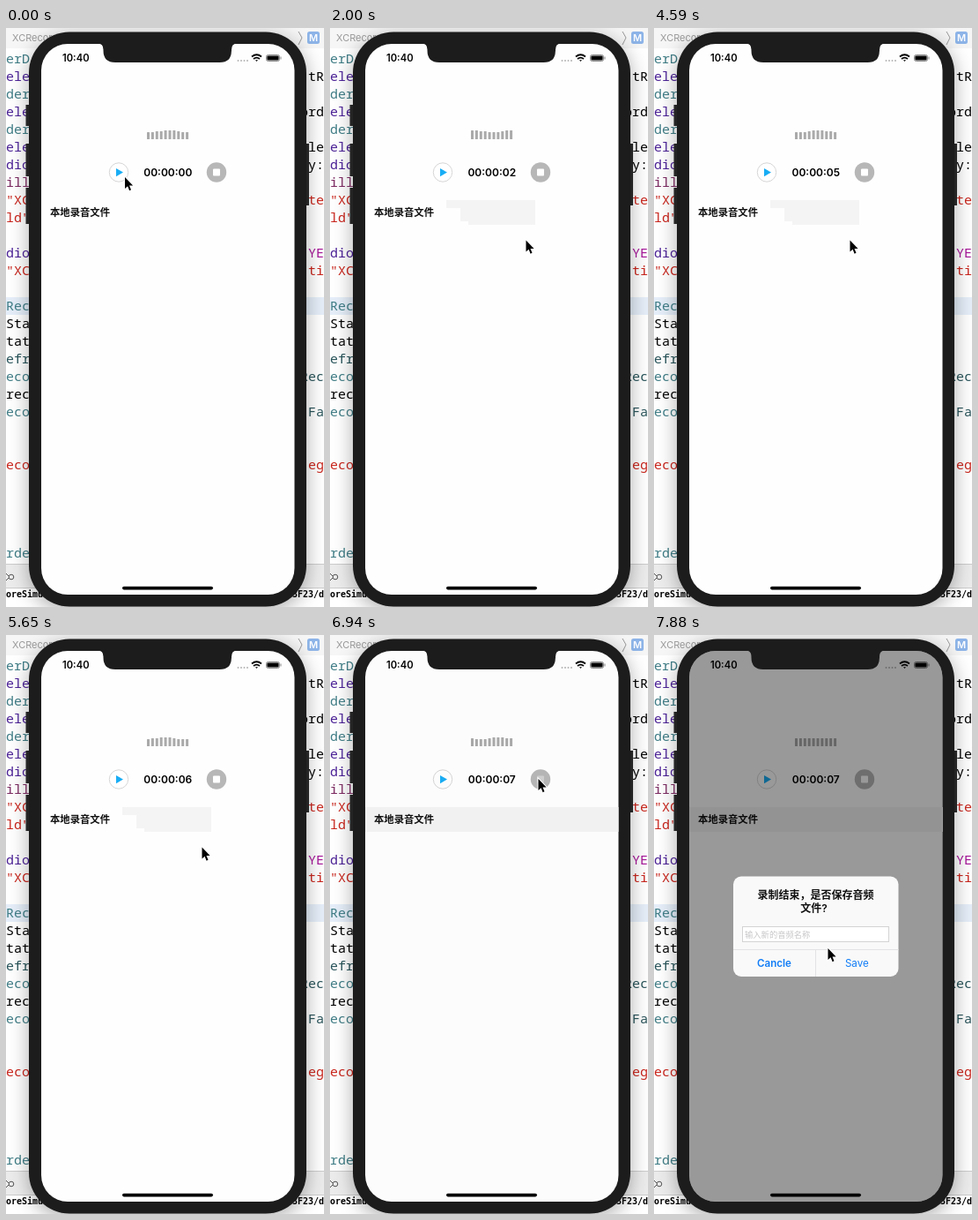
These frames come from a looping animation (361x656 px, 8000 ms). An HTML page:

```html
<!DOCTYPE html>
<html lang="zh-CN">
<head>
<meta charset="utf-8">
<title>Voice recorder</title>
<style>
  html, body { margin: 0; width: 100%; height: 100%; overflow: hidden; background: #fff; }
  svg { display: block; width: 361px; height: 656px; }
  text { font-family: Inter, "Noto Sans CJK SC", "Noto Sans CJK", sans-serif; white-space: pre; }
  .code text { font: 15px "Noto Sans Mono", "DejaVu Sans Mono", monospace; }
  .code .right { text-anchor: end; }
  .console { font: bold 10px "DejaVu Sans Mono", monospace; }
  .mid { text-anchor: middle; }
  .bold { font-weight: 600; }
  .title { font-size: 12px; font-weight: 600; fill: #111; }
  .action { font-size: 11.6px; fill: #107cf6; }
</style>
</head>
<body>
<svg viewBox="0 0 361 656">
  <defs>
    <filter id="shadow" x="-20%" y="-10%" width="140%" height="120%">
      <feDropShadow dx="0" dy="5" stdDeviation="11" flood-opacity=".32"/>
    </filter>
    <clipPath id="screen"><rect x="40" y="18" width="287.5" height="624" rx="30"/></clipPath>
  </defs>

  <!-- editor behind the phone -->
  <rect width="361" height="656" fill="#fff"/>
  <rect width="361" height="23" fill="#f6f6f6"/>
  <text x="7" y="15" font-size="11" fill="#9a9a9a">XCRecorder</text>
  <path d="M332 4l4 7-4 8" fill="none" stroke="#999"/>
  <rect x="342" y="4" width="14" height="14" rx="2.5" fill="#8db4e8"/>
  <text class="mid bold" x="349" y="15" font-size="11" fill="#fff">M</text>
  <rect y="305" width="361" height="20" fill="#e5eef9"/>
  <g class="code" id="code"></g>
  <rect y="607" width="361" height="28" fill="#ececec"/>
  <path d="M0 607.5H361M0 634.5H361" stroke="#ccc"/>
  <g fill="none" stroke="#555">
    <circle cx="6" cy="622" r="2.8"/><path d="M0 618l3 3M0 626l3-3"/>
  </g>
  <text class="console" x="0" y="645">oreSimulator</text>
  <text class="console" x="325" y="645">3F23/d</text>

  <!-- phone body -->
  <g fill="#1c1c1c">
    <path d="M22.5 87h6v24h-6zM22.5 131h6v37h-6zM22.5 181h6v41h-6zM338 131h6v70h-6z" fill="#2b2b2b"/>
    <rect x="26" y="4.500" width="315" height="651" rx="46" filter="url(#shadow)"/>
  </g>

  <g clip-path="url(#screen)">
    <rect id="page" x="39" y="18" width="290" height="624" fill="#fefefe"/>
    <path id="row" fill="#f4f4f4"/>
    <text class="bold" x="64" y="38" font-size="11.2">10:40</text>
    <g fill="#b5b5b5">
      <circle cx="263.5" cy="37" r="1"/><circle cx="267" cy="37" r="1"/>
      <circle cx="270.5" cy="37" r="1"/><circle cx="274" cy="37" r="1"/>
    </g>
    <g fill="none" stroke="#000" stroke-width="1.8">
      <path d="M279 32.500q5.500-4.400 11 0M281 35q3.500-2.800 7 0"/>
      <path d="M283 36.300h3l-1.500 1.700z" fill="#000" stroke="none"/>
    </g>
    <rect x="295.5" y="30.5" width="15" height="7" rx="2" fill="none" stroke="#888"/>
    <rect x="296.4" y="31.4" width="13.2" height="5.200" rx="1"/>
    <path d="M312 32.500v3" stroke="#888"/>

    <g id="bars" fill="#aaa"></g>
    <circle cx="128" cy="163.5" r="10.7" fill="#fff" stroke="#d6d6d6"/>
    <path d="M125 159v9.200l8-4.600z" fill="#18adf5"/>
    <text class="mid" id="timer" x="183.8" y="168" font-size="12" font-weight="600"></text>
    <circle cx="239" cy="163.5" r="11.2" fill="#b7b7b7"/>
    <rect id="stop" x="235" y="159.5" width="8" height="8" rx="1" fill="#fff"/>
    <text class="bold" x="50" y="213" font-size="11.35" fill="#111">本地录音文件</text>
    <rect x="132" y="632.8" width="103" height="3.6" rx="1.8"/>
    <rect id="dim" x="39" y="18" width="290" height="624"/>

    <g id="alert">
      <rect x="90" y="273.5" width="187.5" height="113.5" rx="9" fill="#f9f9f9"/>
      <text class="mid title" x="183.5" y="298.5">录制结束，是否保存音频</text>
      <text class="mid title" x="181.5" y="313.5">文件?</text>
      <rect x="100.5" y="330.5" width="166" height="17" fill="#fff" stroke="#d4d4d4"/>
      <text x="103" y="342.5" font-size="9.3" fill="#c6c6c8">输入新的音频名称</text>
      <path id="caret" d="M103.700 334v10" stroke="#4a7ff0" stroke-width="1.3"/>
      <path id="rules" d="M90 356.500H277.500M183.500 356.500V387" stroke="#e3e3e5"/>
      <text class="mid action bold" x="136.5" y="376">Cancle</text>
      <text class="mid action" x="230.3" y="376">Save</text>
    </g>
  </g>
  <path d="M104 17.500q6.500 0 6.500 7v1q0 13.500 13.500 13.500h118.500q13.500 0 13.500-13.500v-1q0-7 6.500-7z" fill="#1c1c1c"/>
  <path id="pointer" d="M.5 1V14L3.600 11.300 5.600 16.200 7.500 15.300 5.500 10.500H9.600Z"
        stroke="#fff" stroke-width="2" paint-order="stroke"/>
</svg>

<script>
const $ = id => document.getElementById(id);
const LOOP = 8000, STEPS = 68;

const teal = '#3f7d86', dark = '#28545a', purple = '#4b2196', red = '#c9251c', black = '#000', pink = '#a8169a';
const lines = [
  [35, 'erD', teal], [55, 'ele', purple, 'tR'], [75, 'der', teal], [95, 'ele', purple, 'ord'],
  [115, 'der', teal], [135, 'ele', purple, 'le'], [155, 'dio', purple, 'y:'], [175, 'ill', '#7c2a62'],
  [195, '"XC', red, 'te', red], [215, 'ld"', red], [255, 'dio', purple, 'YE', pink],
  [275, '"XC', red, 'ti', red], [315, 'Rec', teal], [335, 'Sta', black], [355, 'tat', black],
  [375, 'efr', dark], [395, 'eco', teal, 'Rec', dark], [415, 'rec', black],
  [435, 'eco', teal, 'Fa', dark], [495, 'eco', red, 'eg', red], [595, 'rde', teal]
];

function add(parent, tag, attrs, text = '') {
  const node = document.createElementNS('http://www.w3.org/2000/svg', tag);
  for (const key in attrs) node.setAttribute(key, attrs[key]);
  node.textContent = text;
  parent.append(node);
  return node;
}

for (const [y, left, color, right, rightColor = black] of lines) {
  add($('code'), 'text', { x: 0, y: y + 5, fill: color }, left);
  if (right) add($('code'), 'text', { class: 'right', x: 361, y: y + 5, fill: rightColor }, right);
}
const bars = Array.from({ length: 10 }, (_, i) =>
  add($('bars'), 'rect', { x: 160 + i * 4.9, width: 3, rx: .6 }));

// pointer stops: step, x, y
const path = [
  [0, 134.5, 168], [2, 134.5, 168], [3, 134.5, 185], [4, 149, 200], [7, 158, 214], [9, 190, 219],
  [12, 222, 224], [14, 222, 224], [16, 222, 239.5], [48, 222, 239.5], [49, 247, 210],
  [51, 260, 200], [54, 245, 172], [57, 236, 162], [62, 236, 162], [64, 250, 250], [67, 197, 354]
];

function pointerAt(step) {
  const next = Math.max(1, path.findIndex(p => p[0] >= step));
  const [a, ax, ay] = path[next - 1], [b, bx, by] = path[next];
  const part = (step - a) / (b - a);
  return [ax + (bx - ax) * part, ay + (by - ay) * part];
}

const block = (x1, x2, bottom) => `M${x1} 195H${x2}V${bottom}H${x1}z`;

// the row highlight only shows where the pointer has passed, until the alert opens
function rowShape(step, x) {
  if (step >= 59) return block(39, 329, 223);
  let shape = '';
  if (step >= 3) shape += block(132, 149, 204);
  if (step >= 4) shape += block(148, 158, 219);
  if (step >= 5) {
    const right = step < 49 ? Math.min(233, x + 11) : step < 50 ? 258 : 271;
    shape += block(157, right, 223);
  }
  return shape;
}

function draw(step) {
  const [x, y] = pointerAt(step);
  $('pointer').setAttribute('transform', `translate(${x} ${y})`);
  $('row').setAttribute('d', rowShape(step, x));
  $('page').setAttribute('fill', step >= 59 ? '#fff' : '#fefefe');

  const seconds = Math.min(7, Math.floor(step * LOOP / STEPS / 1000 + .59));
  $('timer').textContent = '00:00:0' + seconds;
  bars.forEach((bar, i) => {
    const top = step === STEPS - 1 ? 117 : 117 + Math.round(Math.sin(step * 1.3 + 1.6 - i * .7));
    bar.setAttribute('y', top);
    bar.setAttribute('height', 126 - top);
  });

  const since = step - 59;
  const dim = since < 0 ? 0 : [.012, .337, .385][since] ?? .4;
  const scale = [1.2, 1.031, 1.007][since] ?? 1;
  $('dim').setAttribute('opacity', dim);
  $('alert').setAttribute('opacity', since < 1 ? 0 : since === 1 ? .92 : 1);
  $('alert').setAttribute('transform', `translate(183.5 330) scale(${scale}) translate(-183.5 -330)`);
  $('rules').setAttribute('opacity', since > 1 ? 1 : 0);
  $('caret').setAttribute('opacity', since < 5 ? 1 : 0);
  $('stop').setAttribute('opacity', since === 0 || since === 1 ? .35 : 1);
}

const start = performance.now();
function tick() {
  const time = (performance.now() - start) % LOOP;
  draw(Math.floor((time + 8) * STEPS / LOOP) % STEPS);
  requestAnimationFrame(tick);
}
tick();
</script>
</body>
</html>
```
